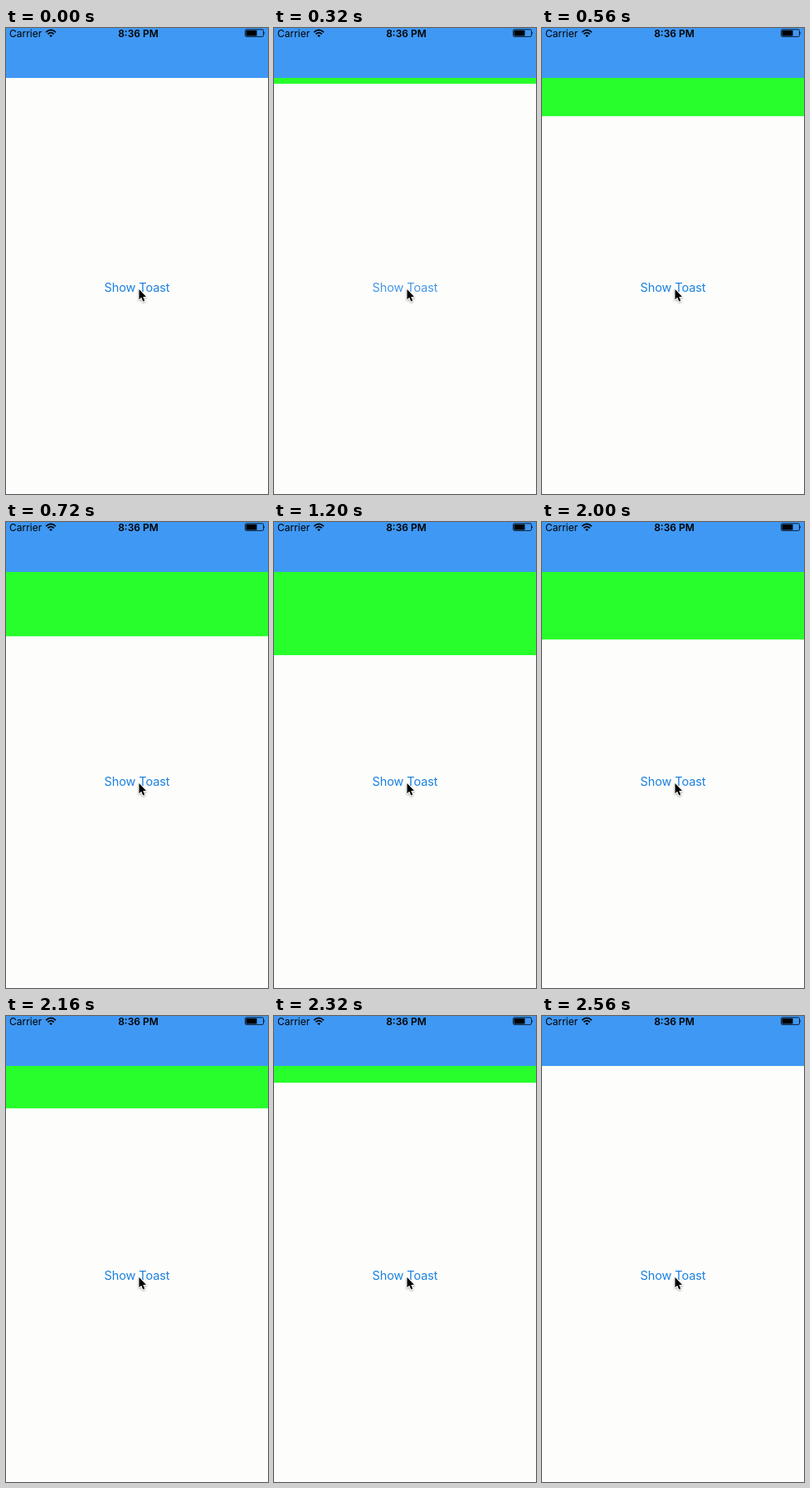
Write an HTML page that moves like this. It is 316 px wide and 560 px high and loops after 2.64 s.

```html
<!DOCTYPE html>
<html lang="en">
<head>
<meta charset="utf-8">
<title>Toast</title>
<style>
  html, body { margin: 0; width: 100%; height: 100%; overflow: hidden; background: #fdfdfc; }
  svg { display: block; position: absolute; left: 0; top: 0; }
  text { font-family: Inter, Roboto, sans-serif; font-size: 12px; }
  #button { font-size: 14.5px; letter-spacing: -.1px; fill: #1a80e0; }
  .clock { font-weight: 600; }
  .cursor { filter: drop-shadow(0 1px 1px #0005); }
</style>
</head>
<body>
<svg width="316" height="560" viewBox="0 0 316 560">
  <rect width="316" height="560" fill="#fdfdfc"/>
  <rect id="toast" y="-40" width="316" height="100" fill="#27fe2b"/>
  <rect width="316" height="60" fill="#3f98f4"/>

  <text x="4" y="10.7">Carrier</text>
  <g fill="none" stroke="#000" stroke-width="1.7">
    <path d="M48.2 5.1Q54.1 -.3 60 5.1"/>
    <path d="M50.4 7.4Q54.1 4 57.8 7.4"/>
  </g>
  <path d="M52.2 9Q54.1 7.3 56 9L54.1 11Z"/>
  <text class="clock" x="159.5" y="10.7" text-anchor="middle">8:36 PM</text>
  <rect x="288.5" y="1.8" width="22" height="8.6" rx="1.6" fill="none" stroke="#000" stroke-width=".8"/>
  <rect x="289.5" y="2.8" width="13" height="6.6" rx=".6"/>
  <path d="M311.4 4.4Q313 6.1 311.4 7.8Z"/>

  <text id="button" x="158" y="317" text-anchor="middle">Show Toast</text>
  <path class="cursor" d="M160.5 314V326.3L163.2 323.8L165.3 328.6L167.3 327.7L165.3 323H169Z"
        stroke="#fff" stroke-width="1.8" stroke-linejoin="round" paint-order="stroke"/>
</svg>
<script>
  const LOOP = 2640, TICK = 80;

  // Each step: [time in ms, value, easing towards the next step]
  const toastSteps = [
    [0, 0], [167, 0, "ease-in-out"], [992, 100],
    [1752, 100, "ease-in-out"], [2577, 0], [LOOP, 0]
  ];
  const buttonSteps = [
    [0, 1, "step-end"], [80, .2], [160, .2, "ease-in-out"], [400, 1], [LOOP, 1]
  ];

  function timeline(id, steps, style) {
    const frames = steps.map(([time, value, easing = "linear"]) =>
      ({ offset: time / LOOP, easing, ...style(value) }));
    const animation = document.getElementById(id)
      .animate(frames, { duration: LOOP, fill: "both" });
    animation.pause();
    return animation;
  }

  const animations = [
    timeline("toast", toastSteps, y => ({ transform: `translateY(${y}px)` })),
    timeline("button", buttonSteps, opacity => ({ opacity }))
  ];

  const start = performance.now();
  function draw() {
    const elapsed = (performance.now() - start) % LOOP;
    const time = Math.floor(elapsed / TICK) * TICK;
    for (const animation of animations) animation.currentTime = time;
    requestAnimationFrame(draw);
  }
  draw();
</script>
</body>
</html>
```
